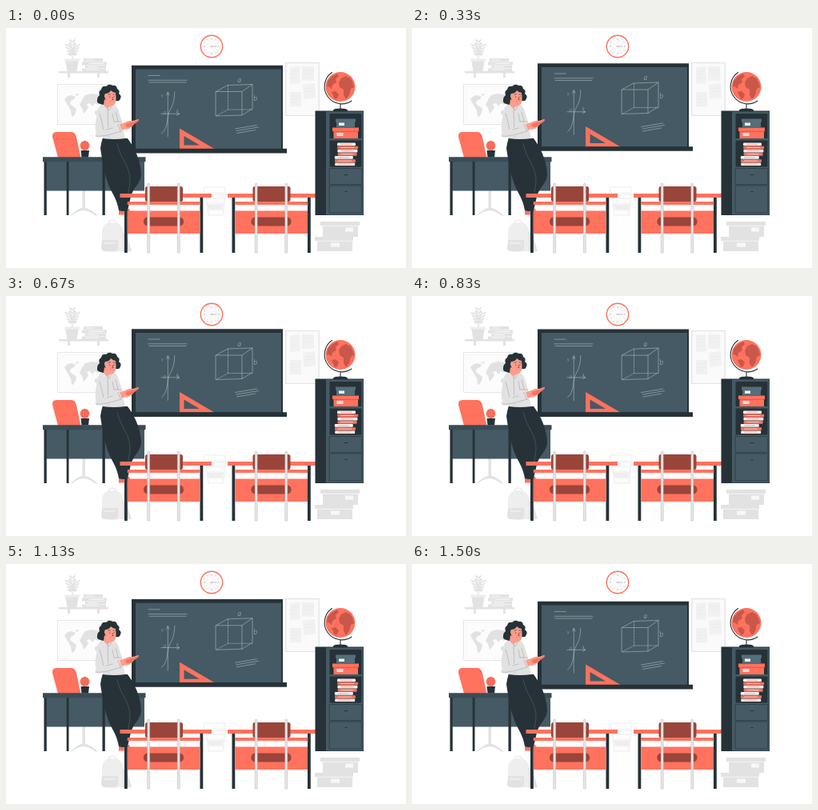
An HTML page that plays this animation: 500x300 px, repeating every 1540 ms.

```html
<!DOCTYPE html>
<html lang="en">
<head>
<meta charset="utf-8">
<title>Classroom</title>
<style>
html, body { margin: 0; width: 100%; height: 100%; overflow: hidden; background: #fff; }
svg { display: block; width: 100%; height: 100%; }
.dark { fill: #263238; }
.slate { fill: #455a64; }
.coral { fill: #ff725e; }
.brown { fill: #99453a; }
.g1 { fill: #f7f7f7; }
.g2 { fill: #eeeeee; }
.g3 { fill: #e2e2e2; }
.skin { fill: #ff9c8b; }
.line { fill: none; stroke-linecap: round; stroke-linejoin: round; }
.chalk { stroke: #c3ccd1; stroke-width: .5; }
.ink { stroke: #263238; stroke-width: .6; }
.fold { stroke: #9a9a9a; stroke-width: .5; }
.pale { stroke: #e2e2e2; stroke-width: .6; }
text { font: italic 300 9px Lato, sans-serif; fill: #c3ccd1; }
.small { font-size: 6px; }
</style>
</head>
<body>
<svg viewBox="0 0 500 300">
  <!-- wall shelf -->
  <path class="g3" d="M66 54h62v2.500H66zM77 56h3v6h-3zM114 56h3v6h-3z"/>
  <path class="g3" d="M74 39h17l-2.500 15h-12z"/>
  <path class="g2" d="M73 38.500h19v3H73z"/>
  <g id="leaves"></g>
  <path class="g3" d="M97 38h24v4H97zM95 42.500h31v4H95zM99 47h26v3H99zM95 50.500h30v3.500H95z"/>
  <path class="line" stroke="#f7f7f7" d="M100 40h10M104 44.500h18M103 48.500h12M100 52.300h15"/>

  <!-- wall map -->
  <path d="M64.500 70.500h69v50h-69z" fill="#fff" stroke="#e6e6e6"/>
  <path d="M67 73h64v45H67z" fill="#fcfcfc" stroke="#eee" stroke-width=".5"/>
  <path class="g3" d="M73 89l4-4 5-1 5 2-2 3-4 2-1 4 4 3 4 3-1 5-3 5-2-1-1-7-3-5-3-5zM86 83l5-1-2 3zM96 88l3-4 8-2 9 1 4 5-2 5-3 3-4-2-3 4-3-4-4 1 2 4-3 5-3 3-2-7-3-4zM111 104l5-2 3 4-4 3-4-1z"/>

  <!-- clock -->
  <circle cx="257" cy="23" r="13.700" fill="#fafafa" stroke="#ff725e" stroke-width="1.400"/>
  <g id="ticks" stroke="#9a9a9a" stroke-width=".6"></g>
  <path class="line" stroke="#8f9a9f" stroke-width=".6" d="M256 23h7"/>
  <circle cx="257" cy="23" r=".6" class="coral"/>

  <!-- notice board -->
  <path d="M349.700 43.500h41.500v66h-41.500z" fill="#fafafa" stroke="#e2e2e2" stroke-width="1.200"/>
  <path fill="#f1f1f1" d="M355 49l12-1 1 21-13 1zM370 48h15v18h-15zM371 71l15-2 1 18-15 2zM355 80h14v18h-14z"/>
  <path class="line" stroke="#e2e2e2" stroke-width=".5" d="M357 54h8M357 58h8M357 62h6M372 53h11M372 57h11M374 76l10-1M374 80l10-1M357 85h10M357 89h10M357 93h7"/>

  <!-- pale items on the floor -->
  <path class="g3" d="M95.500 203h3.500v22h-3.500zM80 235q7-8 17-11 11 3 18 11l-4-1q-6-5-14-6-9 1-14 6z"/>
  <path fill="#fcfcfc" d="M249 207h26l-3 27h-20z"/>
  <path class="line pale" d="M248 199h26v7h-26zM249 208h26M250 213h24M251 220h22M252 227h20M253 234h18M250 208l3 26M274 208l-3 26"/>
  <path class="g2" d="M252 221h20l-2 6h-16z"/>
  <path class="line" stroke="#e2e2e2" stroke-width="1.200" d="M128 246q0-6 5-6t5 6"/>
  <path class="g3" d="M142 252q9 5 12 17l3 10h-14z"/>
  <path class="g2" d="M120 278V256q0-13 13-13t13 13v22q-13 4-26 0z"/>
  <path class="g3" d="M120 265h20v10q0 4-5 4h-11q-5 0-5-4z"/>
  <path class="line" stroke="#f8f8f8" d="M123 269h13"/>
  <path class="g3" d="M393 242h49v5h-49zM396 247h44v14h-44zM386 261h48v5h-48zM389 266h44v13h-44z"/>
  <path class="line" stroke="#f6f6f6" d="M394 247.300h47M387 266.300h46"/>
  <path class="g1" d="M424 249.500h10v5h-10zM406 268.500h11v5h-11z"/>
  <path class="g2" d="M147 142h9v4h-9zM146 147h13v5h-13zM148 153h13v8h-13z"/>

  <!-- sliding chalkboard -->
  <g id="board">
    <path class="dark" d="M157 46.800h189V152H157z"/>
    <path class="slate" d="M162 51.500h182V151H162z"/>
    <g class="line chalk">
      <path d="M178 59.500h14M178 65.300h48M179 68h46"/>
      <path d="M202.300 136V81M200.500 84l1.800-4 1.800 4M194 107.300h22M213.500 105.500l3.500 1.800-3.500 1.800"/>
      <path d="M194.500 132q6-4 7.300-17 .7-9 4-14 5-8 5-21"/>
      <path d="M262.500 79.500H295v29.500l-32.500 1zM262.500 79.500l14.500-8 31-1-13 9M308 70.500v30.500l-13 8"/>
      <path stroke-dasharray="2 1.500" d="M277.500 72v30H308M277.500 102l-15 8"/>
      <path d="M286.500 126l27-4.500M288 128.500l27.500-4.500M288.500 131.500l23-4"/>
    </g>
    <text x="289.500" y="68">a</text>
    <text x="309.500" y="91">b</text>
    <text class="small" x="194" y="86.500">y</text>
    <text class="small" x="213" y="105">x</text>
    <text class="small" x="196.500" y="108">0</text>
    <path class="coral" fill-rule="evenodd" d="M217 125.500l43.500 25.500H217zM222.500 135v11.500H242z"/>
    <path class="dark" d="M153.500 150.700h197.500v5.700H153.500z"/>
  </g>

  <defs>
    <g id="pupil">
      <path class="dark" d="M148 211h3.800v70H148zM242.500 211h3.800v70h-3.800z"/>
      <path class="coral" d="M142.500 207h114.500v5H142.500zM151.800 217h91v4h-91zM151.800 228.500h90.700V257h-90.700z"/>
      <rect class="brown" x="174" y="198" width="47" height="19" rx="2.500"/>
      <rect class="brown" x="172" y="236.500" width="50" height="11" rx="5"/>
      <path fill="#e6e6e6" stroke="#aaa" stroke-width=".4" d="M176.700 281V196q0-2 1.500-2t1.500 2v85zM214.300 281V196q0-2 1.500-2t1.500 2v85z"/>
    </g>
  </defs>
  <use href="#pupil" x="134.500"/>

  <!-- bookcase -->
  <path class="dark" d="M386.500 103.500H447V234h-60.500z"/>
  <path class="slate" d="M400 104.500h46.500V233.500H400z"/>
  <path class="dark" d="M404.500 107h40v31h-40zM404.500 140.500h40v33h-40z"/>
  <path class="line ink" d="M404.500 175.500h40v20h-40zM404.500 197h40v34h-40z"/>
  <path class="line" stroke="#263238" stroke-width="1.200" d="M423 183.500h4M424 204.500h2"/>
  <path fill="#546e7a" d="M412 113.500h25v4h-25zM413 117.500h23v6.500h-23z"/>
  <path fill="#f5f5f5" d="M416 118.500h7v3.500h-7z"/>
  <path class="coral" d="M408 124.500h33v4.500h-33zM409.500 129h30.500v9h-30.500z"/>
  <path class="line" stroke="#b8493c" stroke-width=".6" d="M409 129.300h32"/>
  <path fill="#f7dcd7" d="M413.500 131h8v4h-8z"/>
  <g id="books"></g>

  <!-- globe -->
  <path class="line" stroke="#263238" stroke-width="1.100" d="M407.500 55.500A21 21 0 1 0 432 91M418 95v7"/>
  <circle cx="418" cy="73.500" r="18.500" class="coral"/>
  <path fill="#c9574a" d="M402 66l6-6 6-3 2 3-4 4 1 4-5 3-1 5-4-3-2 1zM419 63l6-3 6 3 3 7 1 4-4 2-2 8-4 5-3-5 0-7-5-3-1-6zM407 80l5-1 4 4-2 5-3 1z"/>
  <path class="dark" d="M409 102.500q1-2 9-2t9 2v1.500h-18z"/>

  <!-- teacher's desk -->
  <path class="coral" d="M58 136q-.5-6 5-6h18q5 0 6.300 5l5.700 27H65z"/>
  <path class="line" stroke="#c9584a" stroke-width=".5" d="M84 131q3 2 4 7l5 23"/>
  <path class="slate" d="M48 166h125v37.500H48z"/>
  <path fill="#3a4c55" d="M46 161.300h128.500v6H46z"/>
  <path class="dark" d="M47.500 167h3.300v67h-3.300zM75.700 167h2.800v67h-2.800zM120.500 167h3.300v67h-3.300z"/>
  <circle cx="98.500" cy="147" r="6" class="coral"/>
  <path class="line" stroke="#c9584a" stroke-width=".5" d="M96 142q-2 5 0 10M98.500 141v11M101 142q2 5 0 10"/>
  <path class="dark" d="M93.500 153h10.500l-1 8.500h-8.500z"/>

  <!-- teacher -->
  <path class="skin" d="M141 226h8l-1 5-6 1z"/>
  <path class="coral" d="M141 228q4 1 6 0l1 5.500h-7zM150 226l4 0 1 3-6 4z"/>
  <path class="dark" d="M121 137l31 1q7 9 11 19 5 12 6 25 0 7-5 14-6 7-8 15l-4 17q-6 2-11 0-2-11-7-20-8-14-11-30-4-19-5-28 1-7 3-13z"/>
  <path class="line" stroke="#54646c" stroke-width=".6" d="M139 145q3 13 11 26 5 9 5 21-1 11-5 27"/>
  <path class="g3" d="M120 95q7 4 13 0 6 2 8 9l4 13 2 12q1 5 2 9-14 2-28 0l1-7q-8 1-10-2-1-5 1-17 1-14 7-17z"/>
  <path class="line fold" d="M117 107q3 9 5 21M137 105q2 6 3 12M127 98l1 38M133 96l-4 7-6-6M122 131q9 1 17-3M112 133q9-2 15-4M133 107l2 10"/>
  <path class="skin" d="M140 121l9-3q5-3 10-2l6-2q2 0 0 2l-5 4q-2 4-6 5l-7 2-6 2z"/>
  <path class="coral" d="M149 121l9-3 7-3 1 1-8 6-7 2z"/>
  <path class="line" stroke="#c95244" stroke-width=".45" d="M150 120l8-2M152 124l6-3M150 127l5-2"/>
  <path class="g3" d="M113 130q8-3 16-6l13-4 3 9-15 5q-13 4-18 2-1-3 1-6z"/>
  <path class="line fold" d="M113 135q6 1 17-2l14-4M126 127l7-2M140 120.500l3.500 9M135 117l9 0"/>
  <path class="dark" d="M118 95q-5-1-4-5 0-4 3-6-2-5 2-7 1-5 6-4 4-4 8-1 5-1 6 4 4 2 2 6 4 3 2 6-1 4-5 3l-6 1q-6 6-14 3z"/>
  <path class="skin" d="M123 89l8 5 1 3-5 3-5-4z"/>
  <path class="skin" d="M124 82q5 0 7-4 3 3 6 3 1 8 0 12-2 5-6 4-6-3-7-9-2-3 0-6z"/>
  <path class="line" stroke="#263238" stroke-width=".6" d="M128 83.300l2.500-.6M134 83l2 .3M129.700 85.800v.8M135 85.800v.8M133 86.500l1 3-1.300.2"/>
  <path d="M130 91.300q3 1.200 5-.3-1.500 3.300-5 .3z" fill="#fff" stroke="#b24b40" stroke-width=".3"/>

  <use href="#pupil"/>
</svg>
<script>
const LOOP = 1540, PEAK = 740, LIFT = 5.6;
const get = id => document.getElementById(id);
const board = get("board");

function fill(id, count, make) {
  get(id).innerHTML = Array.from({ length: count }, (_, i) => make(i)).join("");
}

fill("ticks", 12, i =>
  `<path d="M257 13v${i % 3 ? 1 : 2}" transform="rotate(${i * 30} 257 23)"/>`);

// Pairs of leaves along three stems
fill("leaves", 3, s => {
  const lean = (s - 1) * 17, height = s === 1 ? 23 : 18;
  let out = `<path class="line pale" d="M83 39v${-height}"/>`;
  for (let y = 6; y <= height; y += 4) {
    for (const side of [-1, 1]) {
      out += `<ellipse class="g3" cx="${83 + side * 2}" cy="${38 - y}" rx="1" ry="2.500" transform="rotate(${side * 40} ${83 + side * 2} ${38 - y})"/>`;
    }
  }
  return `<g transform="rotate(${lean} 83 39)">${out}</g>`;
});

// Uneven stack, alternating covers with a contrasting band
const tones = ["#f5f5f5", "#ff725e"];
fill("books", 7, i => {
  const x = 414 - i * .8 + (i * 5 % 4), y = 143.5 + i * 4.15, w = 23 + (i * 3 % 4);
  return `<rect x="${x}" y="${y}" width="${w}" height="3.700" rx="1" fill="${tones[i % 2]}"/>` +
    `<path d="M${x + 4} ${y + 1.8}h${w - 9}" stroke="${tones[1 - i % 2]}" stroke-width=".6"/>`;
});

function draw(ms) {
  const phase = 2 * Math.PI * (ms % LOOP - PEAK) / LOOP;
  const y = -LIFT * (1 + Math.cos(phase)) / 2;
  board.setAttribute("transform", `translate(0 ${y.toFixed(2)})`);
}

const start = performance.now();
function tick() {
  draw(performance.now() - start);
  requestAnimationFrame(tick);
}
draw(0);
requestAnimationFrame(tick);
</script>
</body>
</html>
```
